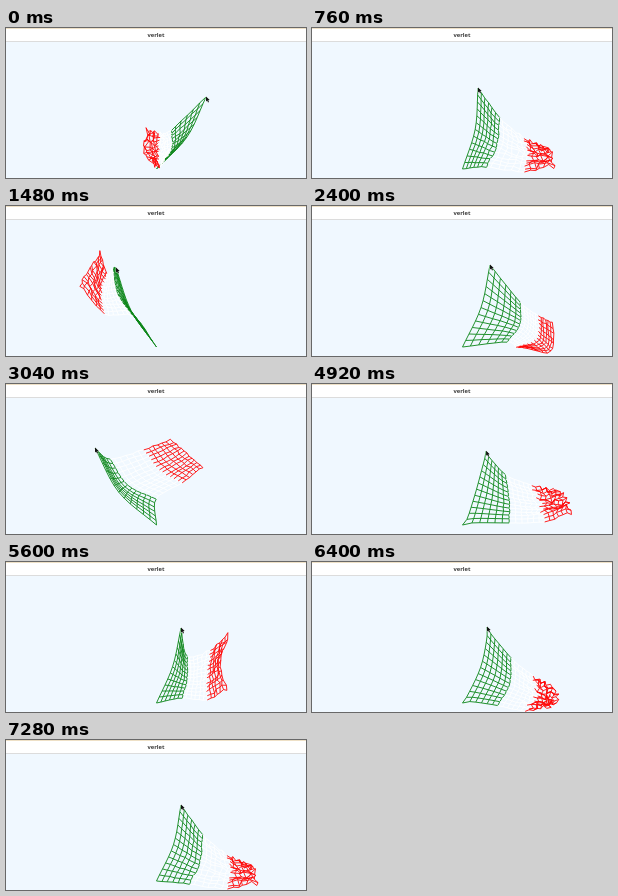
Write an HTML page with a canvas that moves like this. It is 300 px wide and 150 px high and loops after 7320 ms.

```html
<!DOCTYPE html>
<html lang="en">
<head>
<meta charset="utf-8">
<title>verlet</title>
<style>
  html, body { margin: 0; width: 100%; height: 100%; overflow: hidden; background: #f0f8ff; }
  canvas { position: absolute; left: 0; top: 0; width: 300px; height: 150px; }
  header {
    position: absolute; left: 0; top: 0; width: 300px; height: 14px; box-sizing: border-box;
    border-top: 1px solid #eee0c6; border-bottom: 1px solid #dcdcdc; background: #fff;
    font: bold 5.8px/12px "Open Sans", "Noto Sans", sans-serif; color: #3c3c3c; text-align: center;
  }
</style>
</head>
<body>
<canvas id="stage"></canvas>
<header>verlet</header>
<script>
const STEP = 40, LOOP = 7320;
const COLS = 18, ROWS = 12, REST = 4.5;
const PIN = [150.5, 141];

// Cloth shapes relative to the hand: "inner" ends the green third, "outer" is the
// free edge, both as top and bottom. bend bows the held edge, curl adds to it
// towards the free edge, droop lowers the start of the red third.
const shapes = {
  folded:  { inner: [[-35, 33], [-43, 65]], outer: [[-58, 33], [-51, 68]], bend: 7, curl: -14, droop: 3, crumple: 2.4 },
  flung:   { inner: [[-3, 0], [17, 48]], outer: [[-15, -16], [-36, 17]], bend: -6, curl: 6, droop: 14, crumple: 1.4 },
  curled:  { inner: [[30, 37], [17, 77]], outer: [[63, 58], [33, 82]], bend: 5, curl: 16, droop: 2, crumple: 0.8 },
  flying:  { inner: [[15, 11], [61, 51]], outer: [[76, -8], [108, 19]], bend: -9, curl: 9, droop: 1, crumple: 0.8 },
  trailed: { inner: [[-27, 40], [-25, 67]], outer: [[-73, 62], [-58, 75]], bend: 8, curl: -8, droop: 2, crumple: 1.4 },
  blown:   { inner: [[6, 28], [1, 70]], outer: [[48, 6], [46, 61]], bend: 4, curl: -11, droop: 6, crumple: 1.4 },
  resting: { inner: [[21, 29], [8, 79]], outer: [[65, 59], [76, 78]], bend: 5, curl: 0, droop: 4, crumple: 2.6 }
};

// Time, hand and shape
const keys = [
  [0, 200, 69, "folded"], [760, 166, 60, "resting"], [1480, 110, 62, "flung"],
  [1700, 97, 60, "flung"], [2400, 178, 59, "curled"], [2640, 195, 60, "resting"],
  [3040, 89, 64, "flying"], [3420, 73, 66, "flung"], [4200, 173, 68, "trailed"],
  [4640, 172, 70, "flying"], [5080, 175, 66, "resting"], [5600, 175, 66, "blown"],
  [6200, 175, 65, "resting"], [6700, 175, 65, "curled"], [7280, 175, 65, "resting"]
].map(([time, x, y, name]) => ({ time, hand: [x, y], cloth: buildCloth([x, y], shapes[name]) }));

function randomFrom(seed) {
  return () => (seed = (seed * 16807) % 2147483647) / 2147483647;
}

function mix(a, b, k) {
  return [a[0] + (b[0] - a[0]) * k, a[1] + (b[1] - a[1]) * k];
}

// Catmull-Rom curve through evenly spaced points
function curve(points, s) {
  const last = points.length - 1;
  const i = Math.min(last - 1, Math.floor(s * last)), k = s * last - i;
  return [0, 1].map(c => {
    const b = points[i][c], d = points[i + 1][c];
    const a = i > 0 ? points[i - 1][c] : 2 * b - d;
    const e = i + 2 <= last ? points[i + 2][c] : 2 * d - b;
    return b + 0.5 * k * (d - a + k * (2 * a - 5 * b + 4 * d - e + k * (3 * (b - d) + e - a)));
  });
}

// An edge from top to bottom, bowed sideways in its middle
function bowed([top, bottom], amount) {
  const dx = bottom[0] - top[0], dy = bottom[1] - top[1], d = Math.hypot(dx, dy);
  const [x, y] = mix(top, bottom, 0.5);
  return [top, [x + dy / d * amount, y - dx / d * amount], bottom];
}

function buildCloth(hand, { inner, outer, bend, curl, droop, crumple }) {
  const place = ([x, y]) => [hand[0] + x, hand[1] + y];
  const middle = inner.map((p, i) => {
    const [x, y] = mix(p, outer[i], 0.55);
    return [x, y + droop];
  });
  const edges = [[hand, PIN], ...[inner, middle, outer].map(edge => edge.map(place))]
    .map((edge, i) => bowed(edge, bend + curl * (i / 3) ** 2));
  const random = randomFrom(977), points = [];
  for (let r = 0; r <= ROWS; r++) {
    const row = edges.map(edge => curve(edge, r / ROWS));
    for (let c = 0; c <= COLS; c++) {
      const u = c / COLS, [x, y] = curve(row, u), amp = 2 * crumple * u;
      points.push([x + (random() - 0.5) * amp, y + (random() - 0.5) * amp]);
    }
  }
  return points;
}

const at = (c, r) => r * (COLS + 1) + c;
const links = [];
for (let r = 0; r <= ROWS; r++) {
  for (let c = 0; c <= COLS; c++) {
    const shade = Math.max(0, Math.ceil(c / COLS * 3) - 1);
    if (c) links.push([at(c - 1, r), at(c, r), shade]);
    if (r) links.push([at(c, r - 1), at(c, r), shade]);
  }
}

// Pulls linked points towards their rest distance
function relax(points, strength) {
  for (const [i, j] of links) {
    const a = points[i], b = points[j];
    const dx = b[0] - a[0], dy = b[1] - a[1], d = Math.hypot(dx, dy) || 0.01;
    const k = strength * (d - REST) / d;
    a[0] += dx * k; a[1] += dy * k;
    b[0] -= dx * k; b[1] -= dy * k;
  }
}

// Swings ease from shape to shape; the links keep the cloth whole on the way
function poseAt(t) {
  const next = Math.max(1, keys.findIndex(key => key.time >= t));
  const from = keys[next - 1], to = keys[next];
  const k = (t - from.time) / (to.time - from.time), ease = k * k * (3 - 2 * k);
  const hand = mix(from.hand, to.hand, ease);
  const points = from.cloth.map((p, i) => mix(p, to.cloth[i], ease));
  for (let n = 0; n < 6; n++) {
    relax(points, k * (1 - k));
    points[at(0, 0)] = [...hand];
    points[at(0, ROWS)] = [...PIN];
  }
  return { hand, points };
}

const canvas = document.getElementById("stage");
const ctx = canvas.getContext("2d");
const ratio = window.devicePixelRatio || 1;
canvas.width = 300 * ratio;
canvas.height = 150 * ratio;
ctx.scale(ratio, ratio);

const shades = ["#0c8619", "#ffffff", "#ff0808"];
const arrow = new Path2D("M0 0 L0 5 L1.2 4 L2 6 L3 5.6 L2.2 3.7 L3.7 3.5 Z");

function draw(t) {
  const { hand, points } = poseAt(t);
  ctx.fillStyle = "#f0f8ff";
  ctx.fillRect(0, 0, 300, 150);
  ctx.lineWidth = 0.9;
  shades.forEach((color, shade) => {
    ctx.beginPath();
    for (const [i, j, s] of links) {
      if (s !== shade) continue;
      ctx.moveTo(...points[i]);
      ctx.lineTo(...points[j]);
    }
    ctx.strokeStyle = color;
    ctx.stroke();
  });
  ctx.save();
  ctx.translate(hand[0], hand[1] - 0.5);
  ctx.lineWidth = 0.6;
  ctx.strokeStyle = "#fff";
  ctx.stroke(arrow);
  ctx.fillStyle = "#111";
  ctx.fill(arrow);
  ctx.restore();
}

const start = performance.now();
function tick() {
  const t = Math.max(0, performance.now() - start) % LOOP;
  draw(Math.floor(t / STEP) * STEP);
  requestAnimationFrame(tick);
}
draw(0);
requestAnimationFrame(tick);
</script>
</body>
</html>
```
